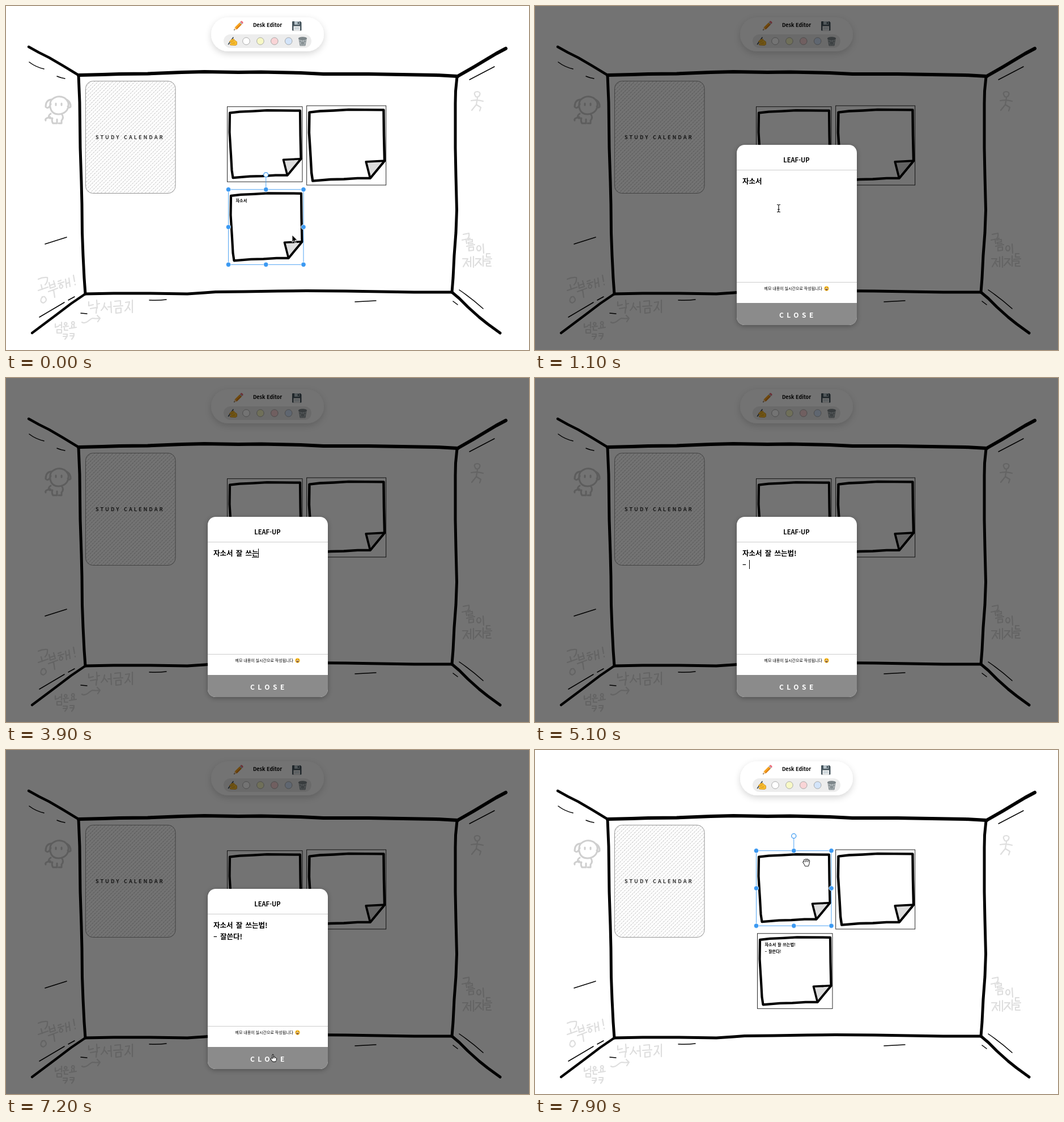
An HTML page that plays this animation: 923 px wide and 607 px high, repeating every 8000 ms.

```html
<!DOCTYPE html>
<html lang="ko">
<head>
<meta charset="utf-8">
<title>Desk Editor</title>
<style>
html, body { margin: 0; width: 100%; height: 100%; overflow: hidden; background: #fff; }
body, text { font-family: "Noto Sans CJK KR", "Noto Sans CJK", "Noto Sans CJK JP", sans-serif; }
svg { display: block; }
.layer { position: absolute; left: 0; top: 0; width: 923px; height: 607px; }
.line { fill: none; stroke: #000; stroke-linecap: round; stroke-linejoin: round; }
#shade { background: rgba(0, 0, 0, .55); }
#modal { position: absolute; left: 355.5px; top: 245px; width: 212px; height: 318px; border-radius: 14px;
  background: #fff; overflow: hidden; box-shadow: 0 2px 8px rgba(0, 0, 0, .3); }
#modal > * { position: absolute; box-sizing: border-box; left: 0; width: 100%; white-space: pre; }
#title { top: 0; height: 45px; border-bottom: 1px solid #ccc; font-size: 11px; font-weight: bold; line-height: 52px; text-align: center; }
#memo { top: 54px; padding-left: 10.5px; font-size: 12.5px; font-weight: bold; line-height: 20px; word-spacing: 1.7px; }
#memo u { display: inline-block; box-sizing: border-box; height: 17px; padding-top: 1px; line-height: 17px;
  vertical-align: top; text-decoration: none; box-shadow: 0 1px #000; }
#memo i { display: inline-block; width: 1px; height: 16px; margin: 2px -1px 0 0; background: #000; vertical-align: top; }
#tip { top: 242px; height: 36px; border-top: 1px solid #ccc; padding-left: 49px; font-size: 7px; line-height: 20px; }
#tip svg { position: absolute; left: 154px; top: 5.5px; }
#close { top: 278.5px; height: 40px; padding-left: 75.5px; background: #8b8b8b; color: #fff;
  font-weight: bold; font-size: 12px; line-height: 41px; letter-spacing: 5.5px; }
</style>
</head>
<body>
<svg class="layer" viewBox="0 0 923 607">
  <defs>
    <pattern id="hatch" width="5" height="4.6" patternUnits="userSpaceOnUse" patternTransform="rotate(-45)">
      <path d="M0 2.3H3.6" stroke="#b9b9b9" stroke-width=".8"/>
    </pattern>
    <g id="note" class="line" stroke-width="4.2">
      <path fill="#fff" d="M4.5 11L22 9 45 8 70 6.500 128.500 7 129 50 130 92 106 121 85 121 62 122.500 40 123 10 125.500 8 112 6.500 85 4 45z"/>
      <path fill="#ddd" stroke-width="3.6" d="M99 93.500L130 92 106 121z"/>
    </g>
    <filter id="soft" x="-20%" y="-40%" width="140%" height="200%">
      <feDropShadow dx="0" dy="4" stdDeviation="6" flood-opacity=".16"/>
    </filter>
  </defs>

  <!-- room -->
  <g class="line" stroke-width="5">
    <path stroke-width="4.5" d="M40 72L58 82 76 91 100 105 128 122"/>
    <path stroke-width="6" d="M128 122L170 121 200 120 250 119.500 310 117 350 116 410 117 450 116.500 520 118 560 120 640 120 700 121 760 122 797 124"/>
    <path stroke-width="6" d="M882 75L865 84 850 93 825 108 797 124"/>
    <path d="M128 122L130 170 131 250 133 310 134 350 134.500 400 136 440 138 480 140 508"/>
    <path d="M796 125L793.500 150 793 172 793 250 794 300 795.500 360 794 400 791 440 789 480 787 505"/>
    <path d="M140 508L190 507 250 507 320 508 350 506 370 504.500 420 504 480 503 530 502.500 600 503 660 504 720 505 787 505"/>
    <path stroke-width="4.2" d="M140 508L115 525 90 544 46 577"/>
    <path d="M787 505L800 516 815 531 835 549 850 561 872 577"/>
    <path stroke-width="1.5" d="M41 99Q53 108 67 111M90 124Q97 127 104 128M69 420L107 408M59 549L103 523M110 519L121 513M253 519Q268 520 283 518M132 542L143 543M616 522L653 520M800 501Q822 516 842 534M789 521L797 527M818 130L862 107"/>
  </g>

  <!-- doodles -->
  <g class="line" style="stroke:#cfcfcf" stroke-width="3">
    <path d="M80 166Q90 156 103 162Q112 168 110 178Q107 190 93 191Q80 191 78 178Q77 171 80 166M80 165Q70 166 70 178Q75 183 79 173M107 165Q115 170 114 178Q111 181 109 177M88 172v3M98 172v3M79 190Q73 194 77 198H82Q80 203 83 207H90V200M98 190Q103 197 98 202V207H93M78 196Q68 198 70 202"/>
  </g>
  <g class="line" style="stroke:#dedede" stroke-width="2.2">
    <path d="M827 156Q826 151 832 151Q838 152 836 157Q834 162 829 160zM832 162L830 174M821 167Q832 165 842 168M830 174L822 184M830 174L838 179 836 185"/>
    <path d="M57 482Q65 478 73 479Q74 487 69 492M62 492L64 500M57 502L74 496M64 513Q58 522 66 524Q74 520 69 514Q67 511 63 515"/>
    <path d="M76 488L78 498 87 495 84 485M78 493L86 490M75 504L91 498M84 501L86 514"/>
    <path d="M92 486L97 484M92 490L102 487M96 491Q92 498 98 498Q103 494 97 491M105 482L107 497M106 490L111 488M111 480L113 495M119 475L121 486M122 491v1"/>
    <path d="M146 522V529L154 527M160 519L161 533M161 526L165 525M149 534L160 532 159 542M174 524Q173 533 168 537M174 530L179 536M185 522L186 541M180 531H185"/>
    <path d="M192 521L202 520V527M190 530L206 529M194 534L203 533V541L194 542zM211 523L218 522Q216 533 210 538M215 530L219 536M223 519V541"/>
    <path d="M87 561V567L93 565M94 563H97M98 558V568M90 571H98V577H90zM105 558.500a2.300 2.300 0 1 0 .5 0M101 566L110 565M103 568V572H109M118 557a2.500 2.500 0 1 0 .5 0M116 564V567M120 563V567M112 569L124 567"/>
    <path d="M134 558Q139 561 145 556T153 551Q160 552 165 551M161 546L166 551 162 557M101 579H108Q108 584 104 588M101 583H108M113 578H120Q120 584 116 588M113 582H120"/>
    <path d="M807 403L817 401Q818 407 815 410M805 413L819 410M812 412L813 419M815 413L823 412V416L816 417V420L824 419M813 424L827 421M817 426L825 425V431L817 432zM834 423a3.500 4.500 0 1 0 1 0M842 420L843 436"/>
    <path d="M806 446H815L807 460M812 452L816 459M815 451H820M820 443V460M825 442V461M829 446H838L828 458M834 451L839 457M842 441V459M842 450H846M848 437H854M848 437V443H855M845 447L857 446M848 450H854V454H848V459H856"/>
  </g>

  <!-- calendar -->
  <rect x="140.5" y="132.5" width="158.500" height="198" rx="13" fill="url(#hatch)" stroke="#8a8a8a" stroke-width=".9"/>
  <text x="158" y="235.300" font-size="9.2" font-weight="bold" fill="#333" letter-spacing="2.93">STUDY CALENDAR</text>

  <!-- toolbar -->
  <rect x="362" y="20" width="199" height="60" rx="30" fill="#fff" filter="url(#soft)"/>
  <rect x="384" y="50" width="155" height="24" rx="12" fill="#ededed"/>
  <text x="461.500" y="37.300" font-size="9" font-weight="bold" text-anchor="middle">Desk Editor</text>
  <g id="swatches" stroke="#999" stroke-width=".8"></g>
  <g transform="translate(402 43) rotate(-45)">
    <path fill="#f2c894" d="M0 0L5-2.600V2.600z"/>
    <path fill="#333" d="M0 0L2-1V1z"/>
    <path fill="#f6a21d" d="M5-2.600H17V2.600H5z"/>
    <path fill="#d97a12" d="M5 .8H17V2.600H5z"/>
    <path fill="#a9b4ba" d="M17-2.600H19V2.600H17z"/>
    <path fill="#ee6b78" d="M19-2.600H21Q23 0 21 2.600H19z"/>
  </g>
  <g transform="translate(505 27)">
    <path fill="#46555d" d="M1 0H14.500L16.500 2V15.500Q16.500 16.500 15.500 16.500H1Q0 16.500 0 15.500V1Q0 0 1 0z"/>
    <path fill="#b5c2c9" d="M4 0H13V6H4z"/>
    <path fill="#46555d" d="M9.800 1H12V5H9.800z"/>
    <path fill="#f5f5f5" d="M2.500 8.500H14V16.500H2.500z"/>
    <path stroke="#9bb0ba" d="M4 11H12.500M4 13.500H12.500"/>
  </g>
  <g transform="translate(391 54)">
    <path stroke="#37474f" stroke-width="1.600" stroke-linecap="round" d="M1.500 13.500L10 1.500"/>
    <path fill="#f7bd2c" stroke="#c98316" stroke-width=".7" d="M3 9L7 5 11 4 12 6 16.500 9V14L14 15.500 5 15 4 13 7 11z"/>
    <path stroke="#c47a17" stroke-width=".7" fill="none" d="M6 9L11 7M8 12L13 11"/>
  </g>
  <g transform="translate(515 54)" fill="none" stroke="#6d767a">
    <path fill="#b9c0c3" stroke-width=".8" d="M2 4L4 16H13L15 4z"/>
    <path stroke-width=".8" d="M5 5L7 15M8.500 5V15M12 5L10 15M3 8L13 14M14 8L4 14"/>
    <ellipse cx="8.500" cy="3.200" rx="7.200" ry="2.200" fill="#7f888c" stroke-width=".9"/>
  </g>

  <g id="notes"></g>
  <g id="saved" font-size="7.2" font-weight="bold" word-spacing=".6">
    <text x="405.500" y="345.500"></text>
    <text x="405.500" y="357.500"></text>
  </g>
  <g id="select" stroke="#3b99f2" fill="none"></g>
</svg>

<div id="dialog" class="layer">
  <div id="shade" class="layer"></div>
  <div id="modal">
    <div id="title">LEAF-UP</div>
    <div id="memo"></div>
    <div id="tip">메모 내용이 실시간으로 작성됩니다<svg width="9" height="9" viewBox="-5 -5 10 10">
      <circle r="4.700" fill="#fbc02d"/><path d="M-3 0H3Q2.500 3.500 0 3.500T-3 0z" fill="#6b3a1a"/>
      <path d="M-2.600 0H2.600V1H-2.600z" fill="#fff"/><path d="M-2-2.500V-1.200M2-2.500V-1.200" stroke="#5b3418"/></svg></div>
    <div id="close">CLOSE</div>
  </div>
</div>

<svg class="layer" viewBox="0 0 923 607">
  <g id="cursor" stroke-linejoin="round" stroke-linecap="round">
    <path id="arrow" fill="#000" stroke="#fff" stroke-width=".9" d="M-2-6.500V6L1 3 3 8 5.200 7 3 2.200H7z"/>
    <path id="grab" fill="#fff" stroke="#000" stroke-width=".9" d="M-4.500 1.500C-7.500-1-5.500-3-3.500-.5L-4.500-4Q-3.500-6.500-2-4.500Q-.5-8 1-5.500Q3-7.500 3.800-4.500Q6-5.500 6.200-2.500Q6 2 4 6.500H-2Q-3 3.500-4.500 1.500zM-1.500-4L-1-1M1.200-5V-1.500M3.800-4L3.500-1"/>
    <path id="point" fill="#fff" stroke="#000" stroke-width="1" d="M-2 1V-5Q-1-7.500 0-5V-1Q2-2.500 2.800-1Q5-1.500 5.500 1Q6 4 4 7H-1.500L-5 2Q-4 0-2 1zM0-1V1M2.800-1V1"/>
    <path id="beam" fill="none" stroke="#000" stroke-width="1.100" d="M-2.500-6.500Q0-6.500 0-5V5Q0 6.500-2.500 6.500M2.500-6.500Q0-6.500 0-5M2.500 6.500Q0 6.500 0 5M-1.500 2H1.500"/>
  </g>
</svg>

<script>
const $ = id => document.getElementById(id);
const show = (el, on) => { el.style.display = on ? "" : "none"; };
const LOOP = 8000, STEP = 100;

// x, y, size
const notes = [[390.5, 177.7, 132.5], [530.7, 176, 140], [392.5, 323.8, 132.5]];

// "_" marks the syllable still being composed
const one = "자소서 잘 쓰는법!", two = one + "\n– ";
const typed = [
  [0, "자소서"], [1800, "자소서 "],
  [2200, "자소서 _ㅈ"], [2300, "자소서 _자"], [2500, "자소서 _잘"], [2600, "자소서 잘 "],
  [2900, "자소서 잘 _ㅆ"], [3000, "자소서 잘 _쓰"], [3300, "자소서 잘 _쓴"], [3700, "자소서 잘 쓰_느"],
  [3900, "자소서 잘 쓰_는"], [4100, "자소서 잘 쓰는_ㅂ"], [4200, "자소서 잘 쓰는_버"],
  [4400, "자소서 잘 쓰는_법"], [4500, one], [4600, one + "\n"], [4900, one + "\n–"], [5100, two],
  [5400, two + "_ㅈ"], [5500, two + "_자"], [5700, two + "_잘"], [5900, two + "잘_ㅆ"], [6100, two + "잘_쓰"],
  [6200, two + "잘_쓴"], [6300, two + "잘쓴_ㄷ"], [6500, two + "잘쓴_다"], [6600, two + "잘쓴다!"]
];

// time, x, y
const path = [
  [0, 507, 411], [300, 507, 411], [800, 431, 358], [1000, 431, 358], [1100, 430, 357], [1600, 470, 319],
  [6700, 476, 320], [7200, 472, 543], [7300, 472, 543], [7800, 478.5, 198.5], [LOOP, 478.5, 198.5]
];

$("swatches").innerHTML = ["#fff", "#f7f8c6", "#f9d4d6", "#d3e4f9"].map((c, i) =>
  `<circle cx="${424 + i * 24.9}" cy="62" r="6.3" fill="${c}"/>`).join("");

$("notes").innerHTML = notes.map(([x, y, s]) =>
  `<g transform="translate(${x} ${y})"><rect width="${s}" height="${s}" fill="#fff" stroke="#111" stroke-width=".9"/>
   <use href="#note" transform="scale(${s / 132.5})"/></g>`).join("");
const frames = [...$("notes").querySelectorAll("rect")];

const S = 132.5, H = S / 2;
const knobs = [[0, 0], [H, 0], [S, 0], [0, H], [S, H], [0, S], [H, S], [S, S]];
$("select").innerHTML = `<path stroke-width=".9" d="M0 0H${S}V${S}H0zM${H} 0V-26"/>` + knobs.map(([x, y]) =>
  `<circle cx="${x}" cy="${y}" r="4.2" fill="#3b99f2" stroke="#fff" stroke-width=".8"/>`).join("") +
  `<circle cx="${H}" cy="-26" r="4" fill="#fff" stroke-width="1.3"/>`;

function cursorAt(t) {
  const i = path.findIndex(p => p[0] > t);
  const [t0, x0, y0] = path[i - 1], [t1, x1, y1] = path[i];
  const k = (t - t0) / (t1 - t0), e = k * k * (3 - 2 * k);
  return [x0 + (x1 - x0) * e, y0 + (y1 - y0) * e];
}

function cursorKind(t, x, y, open) {
  if (open) return y > 523 ? "point" : "beam";
  const over = notes.some(([nx, ny, s]) => x > nx && x < nx + s && y > ny && y < ny + s);
  return over && t >= 400 ? "grab" : "arrow";
}

function draw(t) {
  const open = t >= 1100 && t < 7400;
  show($("dialog"), open);

  const [head, tail] = typed.findLast(k => k[0] <= t)[1].split("_");
  const caret = t >= 1600 && t < 6800 ? "<i></i>" : "";
  $("memo").innerHTML = head + (tail ? `<u>${tail}</u>` : "") + caret;
  const lines = (head + (tail || "")).split("\n");
  [...$("saved").children].forEach((el, i) => { el.textContent = lines[i] || ""; });

  const active = t < 7900 ? 2 : 0;
  frames.forEach((f, i) => show(f, i !== active));
  $("select").setAttribute("transform", `translate(${notes[active][0]} ${notes[active][1]})`);

  const [x, y] = cursorAt(t), kind = cursorKind(t, x, y, open);
  show($("cursor"), t < 1800 || t >= 6800);
  $("cursor").setAttribute("transform", `translate(${x} ${y})`);
  for (const id of ["arrow", "grab", "point", "beam"]) show($(id), id === kind);
}

function tick() {
  draw(Math.floor(performance.now() % LOOP / STEP) * STEP);
  requestAnimationFrame(tick);
}
tick();
</script>
</body>
</html>
```
